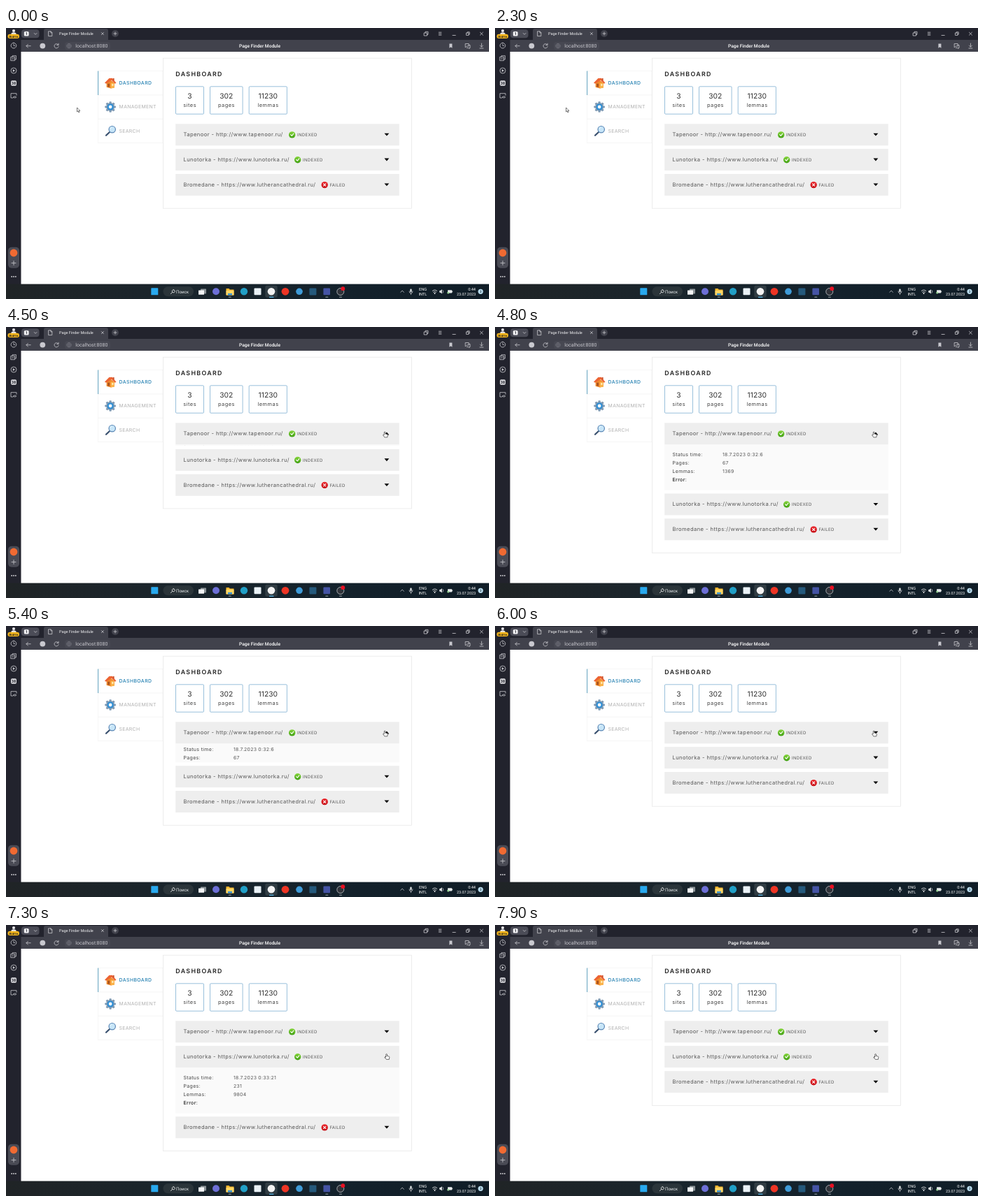
Animation, 690 px wide and 388 px high, one loop 8000 ms. Source, as an HTML page:

```html
<!DOCTYPE html>
<html lang="en">
<head>
<meta charset="utf-8">
<title>Page Finder Module</title>
<style>
html, body { margin: 0; width: 100%; height: 100%; overflow: hidden; background: #fff; }
#stage { display: block; width: 690px; height: 388px; text-rendering: geometricPrecision; }
text { font-family: Roboto, "Noto Sans", sans-serif; white-space: pre; }
.page text { font-family: Inter, sans-serif; }
.line { fill: none; stroke: #c9c9cf; stroke-width: .8; stroke-linecap: round; stroke-linejoin: round; }
</style>
</head>
<body>
<svg id="stage" viewBox="0 0 690 388" xmlns="http://www.w3.org/2000/svg"></svg>
<script>
const rect = (x, y, w, h, fill, r = 0, more = '') =>
  `<rect x="${x}" y="${y}" width="${w}" height="${h}" rx="${r}" fill="${fill}" ${more}/>`;
const dot = (x, y, r, fill, more = '') => `<circle cx="${x}" cy="${y}" r="${r}" fill="${fill}" ${more}/>`;
const shape = (d, fill, more = '') => `<path d="${d}" fill="${fill}" ${more}/>`;
const line = (d, more = '') => `<path class="line" d="${d}" ${more}/>`;
const text = (x, y, str, size, fill, { ls = 0, w = 400, at = 'start' } = {}) =>
  `<text x="${x}" y="${y}" font-size="${size}" fill="${fill}" letter-spacing="${ls}" font-weight="${w}" text-anchor="${at}">${str}</text>`;
const gradient = (id, dir, ...stops) => `<linearGradient id="${id}" ${dir}>` +
  stops.map((c, i) => `<stop offset="${i / (stops.length - 1)}" stop-color="${c}"/>`).join('') + '</linearGradient>';
const mid = { at: 'middle' };

const BODY = 65.3;
const rows = [
  { y: 137.3, name: 'Tapenoor - http://www.tapenoor.ru/', icon: 408.7, ok: true,
    info: ['18.7.2023 0:32:6', '67', '1369', ''] },
  { y: 173.1, name: 'Lunotorka - https://www.lunotorka.ru/', icon: 416.7, ok: true,
    info: ['18.7.2023 0:33:21', '231', '9804', ''] },
  { y: 209, name: 'Bromedane - https://www.lutherancathedral.ru/', icon: 455.2, ok: false }
];

const defs = '<defs>' +
  gradient('bar', '', '#202426', '#1a252c', '#14222c', '#101d27') +
  gradient('good', 'x2="0" y2="1"', '#86d63c', '#3f9f12') +
  gradient('bad', 'x2="0" y2="1"', '#ec2a2f', '#c50d14') + '</defs>';

function topBars() {
  return rect(0, 0, 690, 17.5, '#22232d') + rect(0, 17, 690, 17, '#41424c') + rect(0, 17, 21.5, 350, '#22232d') +
    // tab strip
    rect(22, 2.2, 25.5, 12, '#4b4c57', 4) + rect(25.8, 5, 6.8, 6.6, '#f2f2f4', 1.6) +
    text(29.2, 10.2, '1', 5.4, '#22232d', { at: 'middle', w: 700 }) + line('M40.3 7.5l1.8 1.8 1.8-1.8') +
    shape('M54 17.5V4q0-3 3-3h86q3 0 3 3v13.5z', '#41424c') +
    line('M61 4.8h3l1.8 1.8v5h-4.8zM64 4.8v2h1.8') +
    text(76, 10.2, 'Page Finder Module', 5.5, '#f0f0f2') +
    line('M136.4 6.6l3 3m0-3l-3 3') + dot(156, 8, 5, '#41424c') + line('M154 8h4m-2-2v4') +
    line('M597.5 7h4v4h-4zM599 7V5.3h4v4h-1.5') + line('M618.3 6.2h3.6m-3.6 2h3.6m-3.6 2h3.6') +
    line('M638 10.5h4.2') + line('M657.8 7h3.2v3.4h-3.2zM659 7V5.8h3.2v3.4H661') + line('M677.4 6.2l4 4m0-4l-4 4') +
    // address row
    line('M35.2 25.7h-6.2m2.4-2.4l-2.4 2.4 2.4 2.4') + dot(52.3, 25.6, 3.9, '#c9c9cf') +
    line('M74.8 24.2a3.1 3.1 0 1 0 .3 2.4M75 22.2v2.2h-2.2') +
    rect(84, 20, 65, 11.4, '#474852', 4) + dot(90, 25.7, 3.2, 'none', 'stroke="#80818a" stroke-width=".6"') +
    line('M87 25.7h6M90 22.6q-2.4 3 0 6.2 2.4-3 0-6.2', 'style="stroke:#80818a;stroke-width:.5"') +
    text(99.3, 28, 'localhost:8080', 7, '#c6c6cc') +
    text(362.5, 28, 'Page Finder Module', 6.6, '#fff', { at: 'middle', w: 500 }) +
    shape('M633.4 22.4h4v6.4l-2-1.6-2 1.6z', '#c9c9cf') +
    line('M656.5 22.5h4.6v3.5h-2.6l-2 1.6zM661 24.4h2v4h-1v1.2l-1.6-1.2h-2') +
    line('M679.4 22v5m-2-1.9l2 2 2-2M676.9 29h5');
}

function sideBar() {
  return dot(11, 4, 2.1, '#e8e8ea') + shape('M7.2 9.5q0-3.2 3.8-3.2t3.8 3.2z', '#e8e8ea') +
    rect(2.5, 8.8, 16.5, 6.2, '#f6b71c', 3) + text(10.8, 13.5, 'Войти', 4.5, '#222', { at: 'middle', w: 500 }) +
    line('M11 21.2a3.9 3.9 0 1 1-.1 0M11 23v2.4h1.8') +
    line('M7.2 41.5h5.4v5.2H7.2zM9 41.3v-1.6h5.4v5.3h-1.6M8.5 44h2.7') +
    dot(11, 61, 4, 'none', 'stroke="#c9c9cf" stroke-width=".8"') + shape('M9.8 59l3.2 2-3.2 2z', '#c9c9cf') +
    rect(7, 75.2, 8, 7.6, '#dedee2', 1.8) + text(11, 81.1, '38', 5.6, '#22232d', { at: 'middle', w: 700 }) +
    line('M10 100H7V93.7h8v2.5M10.6 99q2-2.6 4.2 0-2.1 2.6-4.2 0') +
    rect(3, 313.7, 16, 30, '#4a4b55', 5) + dot(11, 322, 5.4, '#f06a32') +
    line('M8 336.5h6m-3-3v6') + [8.2, 11, 13.8].map(x => dot(x, 356, .9, '#d5d5da')).join('');
}

function taskBar() {
  const mark = x => rect(x - 2, 384.8, 4, 1, '#9aa4a8', .5);
  return rect(0, 366.6, 690, 21.4, 'url(#bar)') +
    rect(207.3, 372.3, 10, 10, '#29a9ee', .6) +
    rect(224.5, 370.2, 43.5, 14, '#2b353a', 7) + line('M239.2 374.8a2 2 0 1 0 .1 0M237.6 378.4l-2.2 2.2', 'style="stroke:#fff"') +
    text(243, 379.7, 'Поиск', 6.2, '#e9edef') +
    rect(278, 373.4, 8, 7, '#8a9296', .6) + rect(275, 375.4, 8, 6.4, '#f3f5f6', .6) +
    dot(300, 377.3, 5, '#6d6fd6') +
    shape('M314.5 373h4l1.3 1.4h5.7v8h-11z', '#f4b52d') + rect(314.5, 375.8, 11, 6.6, '#ffd766', .6) + rect(317, 380, 6, 2.4, '#2f8fd8') +
    dot(340, 377.3, 5.2, '#219fc6') + rect(354.5, 372.6, 10, 9.6, '#e9f1f6', 1) +
    rect(370.3, 368.8, 17.4, 17, '#303c43', 2.5) + dot(379, 377.3, 5.3, '#f3f3f3') +
    dot(399, 377.3, 5.4, '#ee3525') + dot(419, 377.3, 4.8, '#3f9bd8') + rect(433.4, 372.4, 10, 10, '#25597c', 1) +
    rect(453.4, 372.4, 9.6, 9.8, '#4554a5', 1) + dot(477.8, 377.5, 5, '#30333a', 'stroke="#c6c9cc" stroke-width=".8"') +
    dot(481.3, 373.2, 2.9, '#e81123') + [319.8, 458.3, 478].map(mark).join('') +
    rect(376, 384.8, 6.5, 1.1, '#58b7e8', .5) +
    line('M563.8 378.3l2.3-2.3 2.3 2.3') + rect(577.2, 373.6, 2.5, 4.6, '#d7dbdd', 1.2) + line('M576 377q0 2.8 2.5 2.8T581 377M578.5 380v1.6') +
    text(595.5, 375.9, 'ENG', 5.6, '#fff', mid) + text(595.5, 382.8, 'INTL', 5.6, '#fff', mid) +
    line('M609.3 376.4q3.2-2.8 6.4 0M610.6 378.2q1.9-1.6 3.8 0', 'style="stroke:#fff"') + dot(612.5, 380, .9, '#fff') +
    shape('M619.3 376h1.4l2-1.8v6.4l-2-1.8h-1.4z', '#fff') + line('M624.2 375.6q1.4 1.8 0 3.6') +
    rect(631, 375.2, 6.2, 4.4, '#e8ebec', .8) + rect(637.3, 376.5, .8, 1.8, '#e8ebec') + dot(631.7, 379, 1.5, '#9fdc9b') +
    text(671, 375.9, '0:44', 5.6, '#fff', { at: 'end' }) + text(671, 382.8, '23.07.2023', 5.4, '#fff', { at: 'end' }) +
    dot(678, 377.3, 3.6, '#b9dcee') + text(678, 379.1, '3', 4.8, '#15222a', mid);
}

function menu() {
  const teeth = Array.from({ length: 8 }, (_, i) => rect(147.5, 105.2, 3.2, 4, '#7f9ab4', .8, `transform="rotate(${i * 45} 149.1 113)"`)).join('');
  const house = shape('M143.6 78l5.6-3.5 5.6 4v7l-5 .9-6.2-1.6z', '#f08a2c') + shape('M149.6 78.5l5.2 0v7l-5 .9z', '#fbb44a') +
    shape('M141 78.6l6.3-6.7 4.6-.2 5.6 7-1.8 1-5-5-7.7 5.1z', '#ec6434') + rect(152.8, 72, 1.8, 3.4, '#c8532f') +
    rect(145.3, 79.7, 2.7, 4.8, '#a5521f') + rect(151.3, 80.2, 2.2, 2.6, '#fff1c9');
  const gear = teeth + dot(149.1, 113, 6, '#7f9ab4') + dot(149.1, 113, 4.6, '#2f8fd6') + dot(149.1, 113, 2.4, '#f4f8fb');
  const lens = line('M147.8 149.2l-4.8 4.6', 'style="stroke:#39506e;stroke-width:2.2"') +
    dot(151.7, 145.2, 4.7, '#c8e6f8', 'stroke="#5885b4" stroke-width="1.2"') + shape('M148.9 144.8q.4-2.6 3-2.8-1.6 1-3 2.8', '#fff');
  return rect(131.5, 61.6, 92.5, 102.8, '#fff', 0, 'stroke="#f2f2f2" stroke-width=".7"') +
    shape('M131.5 96h92.5M131.5 130.2h92.5', 'none', 'stroke="#efefef" stroke-width=".7"') +
    rect(131.2, 61.6, .9, 34.4, '#5198b8') + house + gear + lens +
    text(161.6, 80.9, 'DASHBOARD', 6.9, '#2581b2', { ls: .42, w: 500 }) +
    text(161.6, 115.2, 'MANAGEMENT', 6.9, '#b1b1b1', { ls: .32 }) +
    text(161.6, 149.5, 'SEARCH', 6.9, '#b1b1b1', { ls: .3 });
}

function stat(x, w, n, label) {
  const c = x + w / 2;
  return rect(x, 83.8, w, 39.4, '#fff', 1.2, 'stroke="#7fb0d2" stroke-width=".8"') +
    text(c, 100.8, n, 10.3, '#333', mid) + text(c + .2, 112.6, label, 7.4, '#444', { ls: .5, at: 'middle' });
}

function row(r, i) {
  const cy = r.y + 15.4;
  const sign = line(r.ok ? `M${r.icon - 2} ${cy}l1.6 1.7 2.6-3.3` : `M${r.icon - 1.6} ${cy - 1.4}l3.2 3.2m0-3.2l-3.2 3.2`,
    'style="stroke:#fff;stroke-width:1.1"');
  const labels = ['Status time:', 'Pages:', 'Lemmas:', 'Error:'];
  const body = r.info ? `<svg id="body${i}" x="242" y="${r.y + 31}" width="320" height="0"><rect width="320" height="70" fill="#fafafa"/><g id="info${i}">` +
    labels.map((l, k) => text(11.5, k * 12.2 + 2.5, l, 7, k == 3 ? '#222' : '#444', { ls: .33, w: k == 3 ? 500 : 400 }) +
      text(83, k * 12.2 + 2.5, r.info[k], 6.9, '#555', { ls: .26 })).join('') + '</g></svg>' : '';
  return `<g id="row${i}">` + rect(242.2, r.y, 319.6, 31, '#eeeeee') +
    text(253.5, cy + 2.7, r.name, 7.6, '#555', { ls: .42 }) +
    dot(r.icon, cy + .2, 4.7, r.ok ? 'url(#good)' : 'url(#bad)') + sign +
    text(r.icon + 7.2, cy + 2.5, r.ok ? 'INDEXED' : 'FAILED', 6, '#555', { ls: .38 }) +
    `<path id="mark${i}"/>` + body + '</g>';
}

const hand = shape('M-.9 .6q.9-1.2 1.8 0v2.7l3 .7q1 .4.8 1.6l-.6 3.2h-4.4l-2.5-3.5q.2-1.3 1.9-.2z', '#fff',
  'stroke="#222" stroke-width=".7" stroke-linejoin="round" transform="translate(-.4 0) scale(.9)"');
const arrow = shape('M0 0v6l1.4-1.2 1 2.2 1-.4-1-2.2h1.9z', '#fff', 'stroke="#222" stroke-width=".6" stroke-linejoin="round"');

document.getElementById('stage').innerHTML = defs + rect(0, 0, 690, 388, '#fff') +
  '<g class="page">' + menu() + `<rect id="panel" x="224.4" y="43.2" width="355.2" height="215" fill="#fff" stroke="#e8e8e8" stroke-width=".8"/>` +
  text(242.3, 69.2, 'DASHBOARD', 8.8, '#222', { ls: 1.35, w: 600 }) +
  stat(242.5, 40, '3', 'sites') + stat(291.5, 46.6, '302', 'pages') + stat(347.2, 54.2, '11230', 'lemmas') +
  rows.map(row).join('') + '</g>' + topBars() + sideBar() + taskBar() +
  `<g id="cursor"><g id="arrow">${arrow}</g><g id="hand">${hand}</g></g>`;

const el = id => document.getElementById(id);
const clamp = v => Math.max(0, Math.min(1, v));
const swing = p => .5 - Math.cos(Math.PI * clamp(p)) / 2;
const SLIDE = 200;
// open and close start times per row
const toggles = [[4480, 5290], [7066, 7708]];
// time, x, y of the pointer tip
const path = [
  [2850, 101.5, 114], [3000, 153, 121], [3600, 461, 154], [3700, 495, 153.5],
  [3900, 530, 151.5], [4200, 541.5, 150], [6000, 541.5, 150], [6300, 542, 163], [6700, 544, 184.5]
];

function pointer(t) {
  if (t <= path[0][0]) return path[0].slice(1);
  for (let i = 1; i < path.length; i++) {
    const [t0, x0, y0] = path[i - 1], [t1, x1, y1] = path[i];
    if (t <= t1) {
      const p = (t - t0) / (t1 - t0);
      return [x0 + (x1 - x0) * p, y0 + (y1 - y0) * p];
    }
  }
  return path[path.length - 1].slice(1);
}

function draw(t) {
  const [px, py] = pointer(t);
  let shift = 0;
  let link = px > 131 && px < 224 && py > 61 && py < 165;
  rows.forEach((r, i) => {
    const [open, close] = toggles[i] || [1e9, 1e9];
    const e = swing((t - open) / SLIDE) - swing((t - close) / SLIDE);
    const up = e > .0001, cy = r.y + 15.3;
    el('row' + i).setAttribute('transform', `translate(0 ${shift})`);
    el('mark' + i).setAttribute('d', up ? `M540.5 ${cy + 1.8}h6.8l-3.4-3.8z` : `M540.5 ${cy - 1.8}h6.8l-3.4 3.8z`);
    if (px > 242 && px < 562 && py > r.y + shift && py < r.y + 31 + shift) link = true;
    if (r.info) {
      el('body' + i).setAttribute('height', BODY * e);
      el('body' + i).style.display = up ? '' : 'none';
      el('info' + i).setAttribute('transform', `translate(0 ${4.3 + 9.8 * e})`);
    }
    shift += BODY * e;
  });
  el('panel').setAttribute('height', 215 + shift);
  el('cursor').setAttribute('transform', `translate(${px} ${py})`);
  el('hand').style.display = link ? '' : 'none';
  el('arrow').style.display = link ? 'none' : '';
}

const start = performance.now();
function tick() {
  draw((performance.now() - start) % 8000);
  requestAnimationFrame(tick);
}
tick();
</script>
</body>
</html>
```
